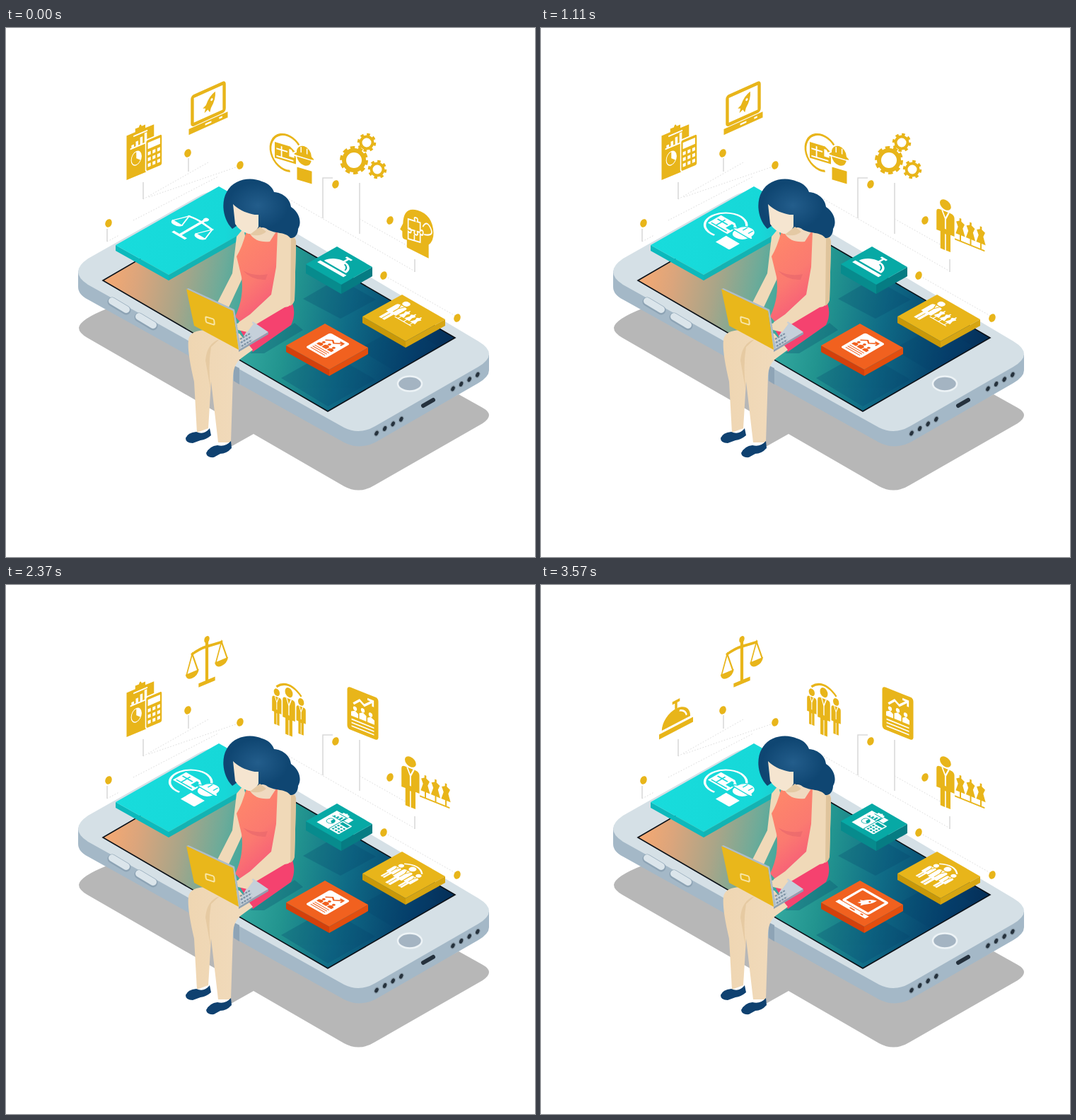
Animation, 748 px wide and 748 px high, one loop 3.6 s. Source, as an HTML page:

```html
<!DOCTYPE html>
<html lang="en">
<head>
<meta charset="utf-8">
<title>Services on a phone</title>
<style>
html, body { margin: 0; width: 100%; height: 100%; overflow: hidden; background: #fff }
svg { display: block; width: 100vw; height: 100vh }
.ink { fill: currentColor }
.line { fill: none; stroke: currentColor }
.cut { fill: var(--bg) }
.cutline { fill: none; stroke: var(--bg) }
</style>
</head>
<body>
<svg viewBox="0 0 748 748">
<defs>
  <linearGradient id="screen" gradientUnits="userSpaceOnUse" x1="136" y1="350" x2="630" y2="450">
    <stop offset="0" stop-color="#f8a971"/><stop offset=".1" stop-color="#dba57c"/>
    <stop offset=".22" stop-color="#aaa588"/><stop offset=".33" stop-color="#6dab99"/><stop offset=".43" stop-color="#32a79e"/>
    <stop offset=".54" stop-color="#22948f"/><stop offset=".7" stop-color="#0f6b86"/>
    <stop offset=".9" stop-color="#053c69"/><stop offset="1" stop-color="#052f58"/>
  </linearGradient>
  <linearGradient id="dress" x1="0" y1="0" x2=".45" y2="1">
    <stop offset="0" stop-color="#ff8a69"/><stop offset=".55" stop-color="#fb7a70"/><stop offset="1" stop-color="#f5547a"/>
  </linearGradient>
  <linearGradient id="bigTile"><stop offset="0" stop-color="#18dcdc"/><stop offset=".7" stop-color="#16d8d8"/><stop offset="1" stop-color="#25b9c4"/></linearGradient>
  <radialGradient id="hair" cx=".45" cy=".45" r=".4"><stop offset="0" stop-color="#235d8b"/><stop offset="1" stop-color="#0f4672"/></radialGradient>
  <linearGradient id="leg"><stop offset="0" stop-color="#efd6b2"/><stop offset="1" stop-color="#f1dbbd"/></linearGradient>

  <g id="person">
    <circle class="ink" cy="-40" r="10"/>
    <path class="ink" d="M-16-20q0-7 7-7h18q7 0 7 7v36h-7v34h-8V18h-2v32h-8V16h-7z"/>
    <path class="cutline" d="M-6-27 0-12 6-27M0-12V8" stroke-width="2.5"/>
  </g>
  <g id="scales">
    <circle class="ink" cy="-45" r="7"/>
    <path class="line" stroke-width="8" d="M0-42V42M-22 45H22"/>
    <path class="line" stroke-width="6" d="M-42-26Q-20-32 0-30T42-26"/>
    <path class="line" stroke-width="3.5" d="M-54 12-39-27-24 12M24 12 39-27 54 12"/>
    <path class="ink" d="M-57 11h36q-3 13-18 13t-18-13zM21 11h36q-3 13-18 13t-18-13z"/>
  </g>
  <g id="laptop">
    <rect class="line" x="-41" y="-43" width="82" height="64" rx="4" stroke-width="8"/>
    <path class="ink" d="M-50 27H50V40H-50zM18-32Q2-28-6-10l-8 4 7 3-3 9 9-4 5 8 3-9Q20-14 18-32z"/>
    <path class="cutline" stroke-width="4" d="M-8 33H8M28 33h8"/>
    <circle class="cut" cx="9" cy="-17" r="3"/>
  </g>
  <g id="calc">
    <path class="ink" d="M-50-40h24v-7h10q4-9 8 0h10v7h24v26H8v66h-58z"/>
    <path class="cutline" stroke-width="3" d="M-31-33H8"/>
    <path class="cutline" stroke-width="7" d="M-33-10v-6m12 6v-10m12 10v-15m12 15v-20"/>
    <path class="cutline" stroke-width="3" d="M-40-9H10"/>
    <circle class="cut" cx="-23" cy="15" r="15"/>
    <path class="ink" d="M-23 15V2a13 13 0 1 0 11 20z"/>
    <rect class="ink" x="3" y="-14" width="46" height="66" rx="5" stroke="var(--bg)" stroke-width="3"/>
    <path class="cut" d="M9-7h34V6H9z"/>
    <path class="cutline" stroke-width="7" stroke-dasharray="8 5" d="M9 16h35M9 28h35M9 40h35"/>
  </g>
  <g id="bell">
    <path class="ink" d="M-42 13a42 36 0 0 1 84 0zM-50 19H50v12H-50z"/>
    <path class="line" stroke-width="7" d="M0-22v-18M-11-40H11"/>
    <path class="cutline" stroke-width="4" d="M10-14Q27-9 31 6"/>
  </g>
  <g id="works">
    <path class="line" stroke-width="4.5" d="M-4 32A38 38 0 1 1 22-22"/>
    <path class="ink" d="M-40-21h36l14 9v25h-50z"/>
    <path class="cutline" stroke-width="3" d="M-36-8H-10M-24-16V7M-36 8H4"/>
    <path class="cut" d="M-6-15h5l7 9v7H-6z"/>
    <path class="ink" stroke="var(--bg)" stroke-width="3" d="M10-13a19 19 0 0 1 38 0l5 3v5h-5q-3 17-19 17T10-5H5v-5zM11 17h38v30H11z"/>
    <path class="cutline" stroke-width="2.5" d="M22-27v12M36-27v12M8-5H50"/>
  </g>
  <g id="team">
    <path class="line" stroke-width="5" d="M-36-42Q0-72 36-42"/>
    <use href="#person" transform="translate(-35 5) scale(.85)"/>
    <use href="#person" transform="translate(35 5) scale(.85)"/>
    <use href="#person" transform="translate(0 5) scale(1.12)"/>
  </g>
  <g id="tailor">
    <use href="#person" transform="translate(-32 0) scale(1.2 1.08)"/>
    <path class="line" stroke-width="3" d="M-12 22H52M0-14V22M22-14V22M44-14V22"/>
    <path id="bust" class="ink" d="M-2-27h4v6l7 4-4 10 5 16h-20l5-16-4-10 7-4z"/>
    <use href="#bust" x="22"/><use href="#bust" x="44"/>
  </g>
  <g id="report">
    <rect class="ink" x="-40" y="-50" width="80" height="100" rx="8"/>
    <path class="cutline" stroke-width="5" d="M-24-14-8-28 4-20 25-37M12-38h14v13"/>
    <g class="cut"><circle cx="-20" cy="-4" r="5"/><circle cy="-7" r="5"/><circle cx="20" cy="-4" r="5"/>
    <path d="M-30 16V6l10-5 8 5v10zM-9 16V3l9-5 9 5v13zM12 16V6l8-5 10 5v10z"/></g>
    <path class="cutline" stroke-width="3" d="M-29 24H29M-29 32H29M-29 40H29"/>
  </g>
  <g id="gears">
    <g class="line"><circle cx="-13" cy="6" r="14" stroke-width="6"/><circle cx="-13" cy="6" r="18" stroke-width="4" stroke-dasharray="6.5 4.8"/></g>
    <g id="cog" class="line"><circle cx="5" cy="-19" r="8.5" stroke-width="4"/><circle cx="5" cy="-19" r="11.5" stroke-width="3.5" stroke-dasharray="4.5 4.5"/></g>
    <use href="#cog" x="15" y="38"/>
  </g>
  <g id="mind">
    <path class="ink" d="M-33 46V28h-8q-6 0-6-8V10l-7-3 9-16Q-43-52 0-52 47-52 49-8 49 12 34 24v33z"/>
    <path class="cutline" stroke-width="3.5" d="M-29-24H-8q-5-9 3-9t4 9H8V-4q9-6 9 3T8 4V24H-29V6q9 5 9-3t-9-4zM-29 0H-9q-4 9 4 9t4-9H8M-10 24V10M16-16q12-20 24-2T20 2"/>
  </g>
</defs>

<!-- ground shadow -->
<path fill="#b7b7b7" d="M103 424Q104 412 145 396L500 590 640 518 674 537Q692 547 674 559L522 646Q500 660 478 648L350 574 318 592V555L115 438Q103 431 103 424Z"/>

<!-- connectors -->
<g fill="none" stroke="#dadada">
  <path stroke-width="1.6" d="M143 302V284M194 242V218M258 203V184M448 269V212H462M500 291V219M578 345V327"/>
  <path stroke-dasharray="1.5 2.5" d="M143 302 160 293M194 242 286 190M202 239 328 196M180 272 300 210M400 242 578 344M500 270 575 312M540 353 637 408"/>
</g>
<g id="dots" fill="#e8b51a"></g>

<!-- phone -->
<path fill="#a4b8c7" d="M102 343V366Q102 377 116 384L478 586Q500 597 522 586L668 502Q683 493 683 484V462L500 520Z"/>
<path fill="#d5e0e6" d="M116 326 270 239Q298 222 324 239L668 443Q698 461 668 479L522 563Q500 576 478 565L116 363Q88 345 116 326Z"/>
<path fill="#8ea4b6" d="M322 477 330 481V504L322 499Z"/>
<g fill="none" stroke-linecap="round"><path stroke="#8da3b4" stroke-width="13" d="M150 387 170 399M188 409 208 421"/><path stroke="#dbe5eb" stroke-width="10" d="M150 386 170 398M188 408 208 420"/></g>
<path fill="url(#screen)" stroke="#0b1118" stroke-width="1.6" d="M137 357 316 253 635 438 455 542Z"/>
<g fill="#05416b" opacity=".25"><path d="M420 383 470 354 523 384 473 411Z"/><path d="M389 495 455 458 522 497 455 535Z"/><path d="M498 454 560 420 610 449 548 484Z"/></g>
<ellipse cx="571" cy="503" rx="17" ry="10.5" fill="#a4b4c2" stroke="#edf3f6" stroke-width="2.5"/>
<path stroke="#25313d" stroke-width="6" stroke-linecap="round" d="M590 534 604 526"/>
<g id="holes" fill="#26323d" stroke="#8fa1ae" stroke-width="1.2"></g>

<!-- tiles -->
<g id="tiles"></g>
<g id="icons"></g>

<!-- woman -->
<path fill="#084b6b" opacity=".3" d="M345 460 408 417 420 427 365 460Z"/>
<path fill="#f5426f" d="M345 392 402 382Q412 402 403 420L349 458 330 425Z"/>
<path fill="#f0d9b8" d="M326 295 336 283 342 315 335 352 314 397 297 392 320 347Z"/>
<path fill="url(#leg)" d="M258 441Q260 427 284 427L330 432 349 455 334 466Q322 474 321 492L318 586H300L290 500 286 566 270 572 266 500Q256 458 258 441Z"/>
<path fill="#e6caa2" d="M282 470Q284 446 302 440L290 451Q285 480 290 515Z"/>
<path fill="#0f4170" d="M254 580Q257 572 269 571 280 576 288 566L290 576Q283 582 275 583L264 587Q254 587 254 580ZM283 601Q288 591 299 590 310 593 318 584L319 594Q312 602 303 602L294 607Q284 608 283 601Z"/>
<path fill="url(#dress)" d="M340 287 346 286Q352 302 372 302L380 288 390 289 387 340 397 388Q368 393 340 425L324 408Q337 381 333 352L326 323Q334 310 340 287Z"/>
<path fill="#e8676c" opacity=".65" d="M335 343Q351 352 370 348L367 356Q348 357 335 343Z"/>
<path fill="#f0dac0" d="M343 286 345 291Q353 304 373 302L382 288 379 266 348 270Z"/>
<path fill="#f0d9b8" d="M384 288 398 287Q411 292 410 306L408 384Q406 393 394 395L347 423Q337 430 327 426L329 416 345 405 375 377 382 338Z"/>
<path fill="#dfc49c" d="M403 296Q411 295 410 306L408 384Q407 390 402 393Z"/>
<path fill="url(#hair)" d="M320 284C306 270 304 246 312 232 322 213 346 210 362 217 372 220 377 226 379 232 392 233 402 242 403 253 414 260 419 274 413 284 413 292 408 298 402 297 396 288 380 291 370 285 362 279 357 283 356 290L340 270Z"/>
<path fill="#f5e5d0" d="M321 249C328 257 346 265 357 264V281Q352 292 343 291 330 287 324 277Z"/>
<path fill="#e4c9a4" d="M345 292 359 281 368 288Q359 296 345 292Z"/>

<!-- laptop -->
<path fill="#c5d0da" d="M329 447 349 415 371 430 329 455Z"/>
<path fill="#8fa2b2" d="M329 455 371 430 371 433 329 458Z"/>
<path fill="none" stroke="#7d92a4" stroke-width="2.2" stroke-dasharray="3 1.3" d="M331 440 345 432M332 445 347 436M333 450 348 441"/>
<path fill="#f0d9b8" d="M326 418Q340 413 350 418L341 430 328 427Z"/>
<path fill="#aebdc9" d="M255 369 258 368 323 398 332 452 329 455 321 401Z"/>
<path fill="#e9b71b" d="M255 369 321 400 329 455 266 421Z"/>
<rect x="-6" y="-4" width="12" height="8" rx="2" fill="none" stroke="#f8e6a8" stroke-width="2" transform="matrix(1 .3 .1 1 288.5 414)"/>
</svg>
<script>
const el = id => document.getElementById(id);
const YELLOW = '#e8b51a', LOOP = 3600, FIRST = 510, GAP = 390;

el('dots').innerHTML = [[145, 276], [257, 177], [331, 194], [466, 221], [543, 272], [534, 350], [638, 410]]
  .map(([x, y]) => `<ellipse cx="${x}" cy="${y}" rx="4.6" ry="6" transform="rotate(20 ${x} ${y})"/>`).join('');

el('holes').innerHTML = [[524, 573], [632, 510]].map(([x, y]) => [0, 1, 2, 3].map(i =>
  `<ellipse cx="${x + i * 11.6}" cy="${y - i * 6.6}" rx="3" ry="4.3" transform="rotate(25 ${x + i * 11.6} ${y - i * 6.6})"/>`).join('')).join('');

// Isometric slab: left, bottom and right corners of the top face, then its thickness.
function slab([lx, ly], [bx, by], [rx, ry], depth, top, left, right) {
  return `<path fill="${left}" d="M${lx} ${ly}v${depth}L${bx} ${by + depth}v${-depth}z"/>
    <path fill="${right}" d="M${bx} ${by}v${depth}L${rx} ${ry + depth}v${-depth}z"/>
    <path fill="${top}" d="M${lx} ${ly}L${bx} ${by} ${rx} ${ry} ${lx + rx - bx} ${ly + ry - by}z"/>`;
}
el('tiles').innerHTML =
  slab([155, 307], [230, 349], [376, 266], 8, 'url(#bigTile)', '#0cb9bc', '#13b3b3') +
  slab([424, 334], [474, 363], [518, 338], 13, '#07a9a5', '#078b8d', '#067c83') +
  slab([504, 408], [565, 443], [621, 412], 9, YELLOW, '#c99808', '#d6a512') +
  slab([396, 449], [457, 483], [512, 452], 9, '#f1611f', '#d3400b', '#e24e0e');

const flat = (x, y, s) => `matrix(${s} ${s * .577} ${-s} ${s * .577} ${x} ${y})`;
const wall = (x, y, sx, sy, slope) => `matrix(${sx} ${sx * slope} 0 ${sy} ${x} ${y})`;
const upright = (x, y) => `translate(${x} ${y})`;

// Each place: swap order, ink, background, then icon and pose before and after.
const places = [
  [0, '#fff', '#17d9d9', 'scales', flat(264, 282, .42), 'works', flat(265, 284, .55)],
  [1, YELLOW, '#fff', 'mind', wall(582, 288, .46, .58, .3), 'tailor', wall(593, 287, .66, .66, .4)],
  [2, YELLOW, '#fff', 'gears', upright(505, 181), 'report', wall(504.5, 181.5, .55, .6, .4)],
  [2, '#fff', '#07a9a5', 'bell', flat(470, 335, .37), 'calc', flat(471, 335, .31)],
  [3, YELLOW, '#fff', 'works', wall(404, 182, .6, .66, .3), 'team', wall(400, 176, .49, .6, .4)],
  [3, '#fff', YELLOW, 'tailor', flat(562, 406, .36), 'team', flat(561, 410, .35)],
  [4, YELLOW, '#fff', 'laptop', wall(286, 114, .55, .62, -.45), 'scales', wall(284, 107, .53, .67, -.42)],
  [5, '#fff', '#f1611f', 'report', flat(455, 449, .35), 'laptop', flat(454, 450, .42)],
  [6, YELLOW, '#fff', 'calc', wall(196, 169, .51, .68, -.42), 'bell', wall(191, 188, .48, .58, -.52)]
];

const shown = places.map(([order, ink, bg, ...poses]) => {
  const use = document.createElementNS('http://www.w3.org/2000/svg', 'use');
  use.style.cssText = `color:${ink};--bg:${bg}`;
  el('icons').append(use);
  return { use, poses, time: FIRST + order * GAP, state: -1 };
});

function draw() {
  const t = performance.now() % LOOP;
  for (const place of shown) {
    const state = t < place.time ? 0 : 1;
    if (state === place.state) continue;
    place.state = state;
    place.use.setAttribute('href', '#' + place.poses[state * 2]);
    place.use.setAttribute('transform', place.poses[state * 2 + 1]);
  }
  requestAnimationFrame(draw);
}
draw();
</script>
</body>
</html>
```
